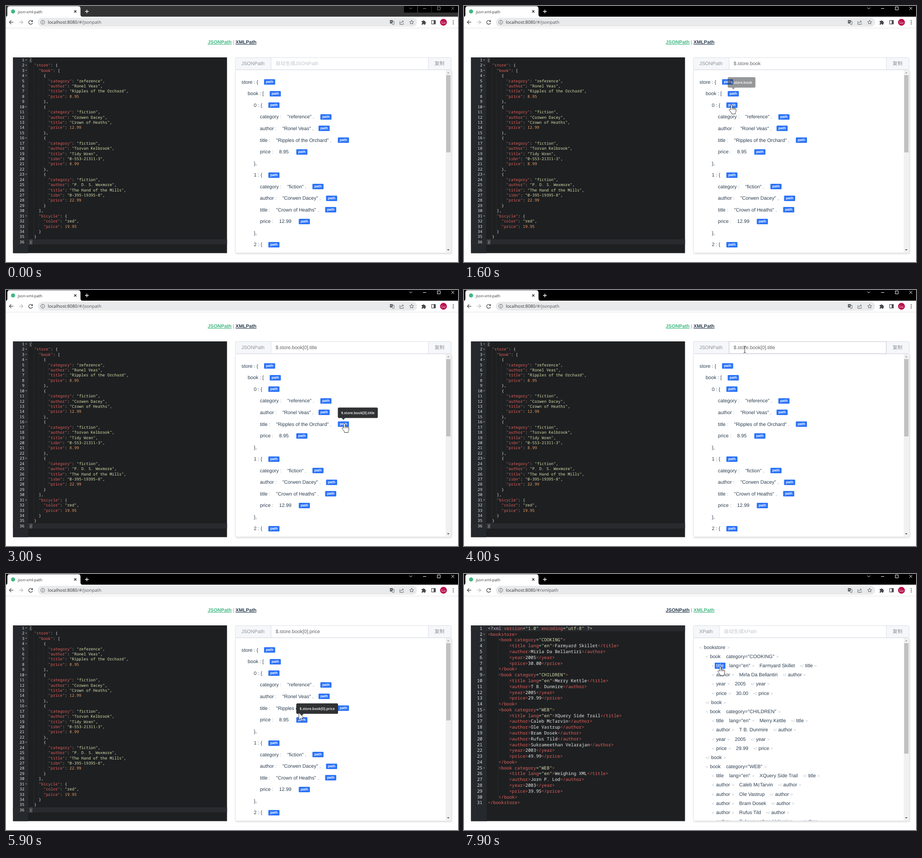
Animation of 995 by 563 pixels, one loop 8 s. Source, as an HTML page:

```html
<!DOCTYPE html>
<html lang="en">
<head>
<meta charset="utf-8">
<title>json-xml-path</title>
<style>
html, body { margin: 0; width: 100%; height: 100%; overflow: hidden; background: #fff; }
svg { display: block; width: 995px; height: 563px; }
text { font: 10.8px "Liberation Sans", Arial, "Noto Sans CJK SC", "Noto Sans CJK", sans-serif; fill: #2c3e50; white-space: pre; text-rendering: geometricPrecision; }
.ui { font-family: "Open Sans", "Noto Sans", sans-serif; fill: #333; }
.code { font-family: "Noto Sans Mono", "DejaVu Sans Mono", monospace; font-weight: 500; fill: #e6e8e4; }
.nav { font-weight: bold; font-size: 10.75px; }
.nav .u { text-decoration: underline; }
.mute { fill: #909399; }
.pale { fill: #b4bac6; font-size: 9px; }
.chip { font-weight: bold; font-size: 7.7px; fill: #fff; }
.tip { font: 600 7.8px "Open Sans", "Noto Sans", sans-serif; fill: #fff; }
.red { fill: #e2605c; } .str { fill: #d9deab; } .num { fill: #f0a064; }
.op { fill: #a5d0c9; } .kw { fill: #c9a8d0; }
</style>
</head>
<body>
<svg id="stage" viewBox="0 0 995 563"></svg>
<script>
const BLUE = '#2d74f7', GREEN = '#42b983', NAVY = '#2c3e50';
const LOOP = 8000, STEP = 100;

const esc = s => String(s).replace(/&/g, '&amp;').replace(/</g, '&lt;').replace(/>/g, '&gt;');
const text = (x, y, s, attr = '') => `<text x="${x}" y="${y}" ${attr}>${s}</text>`;
const span = (s, cls = '', dx = 0) => `<tspan class="${cls}" dx="${dx}">${esc(s)}</tspan>`;
const rect = (x, y, w, h, fill, attr = '') =>
  `<rect x="${x}" y="${y}" width="${w}" height="${h}" fill="${fill}" ${attr}/>`;
const line = (d, stroke, w = 1.2, attr = '') =>
  `<path d="${d}" fill="none" stroke="${stroke}" stroke-width="${w}" ${attr}/>`;
const shape = (d, fill, attr = '') => `<path d="${d}" fill="${fill}" ${attr}/>`;

// ---- content
const store = {
  store: {
    book: [
      { category: 'reference', author: 'Ronel Veas', title: 'Ripples of the Orchard', price: 8.95 },
      { category: 'fiction', author: 'Corwen Dacey', title: 'Crown of Heaths', price: 12.99 },
      { category: 'fiction', author: 'Torvan Kelbrook', title: 'Tidy Wren', isbn: '0-553-21311-3', price: 8.99 },
      { category: 'fiction', author: 'P. D. S. Wexmore', title: 'The Hand of the Mills', isbn: '0-395-19395-8', price: 22.99 }
    ],
    bicycle: { color: 'red', price: 19.95 }
  }
};
const shelf = [
  ['COOKING', 'Farmyard Skillet', ['Mirla Da Bellantiri'], 2005, '30.00'],
  ['CHILDREN', 'Merry Kettle', ['T B. Dunmire'], 2005, '29.99'],
  ['WEB', 'XQuery Side Trail', ['Caleb McTarvin', 'Ole Vastrup', 'Bram Dosek', 'Rufus Tild', 'Sukrameethan Velarajan'], 2003, '49.99'],
  ['WEB', 'Weighing XML', ['Jorn P. Lod'], 2003, '39.95']
];

// Each node: [level, tag, attribute, value]; tags starting with "/" close.
const nodes = [[0, 'bookstore']];
for (const [cat, title, authors, year, price] of shelf) {
  nodes.push([1, 'book', `category="${cat}"`], [2, 'title', 'lang="en"', title]);
  authors.forEach(a => nodes.push([2, 'author', '', a]));
  nodes.push([2, 'year', '', year], [2, 'price', '', price], [1, '/book']);
}
nodes.push([0, '/bookstore']);

// ---- editor
const jsonRules = [[/^"[^"]*"(?=:)/, 'red'], [/^"[^"]*"/, 'str'], [/^[\d.]+/, 'num'], [/^[^"\d]+/, '']];
const xmlRules = [[/^<\?/, ''], [/^xml(?= v)/, 'kw'], [/^\?>/, ''], [/^"[^"]*"/, 'str'], [/^=/, 'op'],
  [/^<\/?\w+/, 'red'], [/^ ?(lang|category|version|encoding)(?==)/, 'red'], [/^>/, 'red'], [/^[^<>="?]+/, ''], [/^./, '']];

function paint(src, rules) {
  let out = '';
  while (src) {
    const [re, cls] = rules.find(r => r[0].test(src));
    const part = src.match(re)[0];
    out += span(part, cls);
    src = src.slice(part.length);
  }
  return out;
}

function editor(lines, o) {
  const size = o.cw / 0.6, attr = `class="code" style="font-size:${size}px"`;
  let out = rect(15.5, 113, 471, 430.5, '#1d1f21') + rect(15.5, 113, o.x - 18, 430.5, '#25282c') +
    rect(15.5, 113 + o.active * o.pitch, 471, o.pitch, '#282a2e');
  lines.forEach((src, i) => {
    const indent = src.search(/\S/), top = 113 + i * o.pitch, base = top + o.pitch / 2 + size * 0.36;
    for (let c = o.tab; c <= indent; c += o.tab)
      out += line(`M${o.x + c * o.cw - 0.5} ${top}v${o.pitch}`, '#fff', 0.7, 'stroke-dasharray="1 1" opacity=".14"');
    out += text(40.5, base, i + 1, attr + ' text-anchor="end"');
    if (o.fold(src)) out += shape(`M42.3 ${base - 4}h4l-2 2.4z`, '#8a8d90');
    out += text(o.x + indent * o.cw, base, paint(src.trim(), o.rules), attr);
  });
  return out;
}

const jsonLines = JSON.stringify(store, null, 2).split('\n');
const xmlLines = ['<?xml version="1.0" encoding="utf-8" ?>'].concat(nodes.map(([lv, tag, at, val]) =>
  ' '.repeat(lv * 4) + `<${tag}${at ? ' ' + at : ''}>` + (val ? `${val}</${tag}>` : '')));

// ---- right panel
const ROW = 25.54, chipTop = i => Math.round(161.3 + ROW * i);
const chipX = [568, 580.5, 577.5, 692, 688, 730.5, 639, 0, 577.5, 674.5, 704.5, 702.5, 644.5, 0, 577.5];

function jsonTree() {
  const rows = [[0, 'store : {'], [1, 'book : [']];
  store.store.book.forEach((book, i) => {
    rows.push([2, i + ' : {']);
    for (const k in book) {
      const v = book[k], isText = typeof v === 'string';
      rows.push([3, span(k) + span(' :', 'mute') + span(isText ? `"${v}"` : v, '', 12.8) + (isText ? span(',', 'mute', 3) : '')]);
    }
    rows.push([2, '},']);
  });
  return rows.slice(0, chipX.length).map(([lv, s], i) => {
    const x = chipX[i], y = chipTop(i);
    return text(518.5 + lv * 13.5, 170.8 + ROW * i, s) +
      (x ? rect(x, y, 24.5, 12, BLUE, 'rx="1.5"') + text(x + 12.25, y + 8.4, 'path', 'class="chip" text-anchor="middle"') : '');
  }).join('');
}

function xmlTree() {
  return nodes.slice(0, 20).map(([lv, tag, at, val], i) => {
    const shut = tag[0] === '/', name = tag.replace('/', '');
    let s = span(shut ? '</' : '<', 'pale') + `<tspan dx="4.2"${i === 2 ? ' id="hot"' : ''}>${name}</tspan>`;
    if (at) s += span(at, '', 12);
    s += span('>', 'pale', 4);
    if (val) s += span(val, '', 11) + span('</', 'pale', 11) + span(name, '', 3.8) + span('>', 'pale', 3.4);
    return text(518.5 + lv * 13.5, 164.8 + 20.17 * i, s);
  }).join('');
}

function panel(label, split, thumb, tree) {
  return rect(505, 140.5, 475, 402.5, '#fff', 'rx="2" stroke="#dcdfe6" filter="url(#soft)"') +
    rect(505, 113.5, 475, 26.5, '#f5f7fa', 'rx="2" stroke="#dcdfe6"') +
    rect(split, 113.5, 929.5 - split, 26.5, '#fff', 'stroke="#dcdfe6" class="field"') +
    text(518, 129.8, label, 'class="mute"') + text(943.5, 129.8, '复制', 'class="mute"') +
    rect(968, 141, 11.5, 401.5, '#f1f1f1') + rect(969, 152, 9.5, thumb, '#c1c1c1') +
    shape('M971 148h5l-2.5-3z', '#a3a3a3') + shape('M971 535h5l-2.5 3z', '#505050') +
    `<g clip-path="url(#inner)">${tree}</g>`;
}

const link = (s, color) => `<tspan class="u" style="fill:${color}">${s}</tspan>`;
const nav = (a, b) => text(444, 83, link('JSONPath', a) +
  '<tspan style="fill:#b87868" font-weight="normal"> | </tspan>' + link('XMLPath', b), 'class="nav"');
const url = path => text(92, 39.2, `localhost:8080<tspan style="fill:#55585c">/#/${path}</tspan>`, 'class="ui" style="font-size:9.67px"');

// ---- browser frame
function chrome() {
  const ink = '#45484c', dark = '#5f6368';
  let s = rect(0, 0, 995, 24, '#333', 'id="bar"') + '<g id="blocks">';
  [876, 907, 937, 966].forEach(x => s += rect(x, 0, 29, 14.5, '#000'));
  s += '</g><g id="buttons" fill="none" stroke="#fff">' +
    '<path d="M888 3.5l3 3 3-3M918 5.5h7M949.5 2h6.5v6.5h-6.5zM980.5 2l6 6.5M986.5 2l-6 6.5"/></g>';
  s += shape('M0 24Q3 23 3 19V6Q3 .5 8 .5H159Q164 .5 164 6V19Q164 23 168 24Z', '#fff') +
    '<circle cx="15.5" cy="12" r="4.5" fill="#41b883"/>' +
    text(26, 15.6, 'json-xml-path', 'class="ui" style="font-size:8.4px"') +
    line('M150 9.5l5 5M155 9.5l-5 5', '#222', 1.2) + line('M174 12h8M178 8v8', '#fff', 1.3) +
    rect(0, 23.5, 995, 24.5, '#fff') + rect(0, 48, 995, 0.8, '#dcdcdc') +
    rect(70, 26, 835, 19.5, '#e9eaeb', 'rx="9.75"') +
    line('M16 35.7H7.5M11.5 31.5l-4.2 4.2 4.2 4.2', ink, 1.3) +
    line('M28.5 35.7H37M33 31.5l4.2 4.2-4.2 4.2', '#b5b7ba', 1.2) +
    line('M57.7 33.2A4.3 4.3 0 1 0 58.4 37.2', ink, 1.3) + shape('M59 30.8v4.2h-4.2z', ink) +
    `<circle cx="81" cy="35.7" r="4.3" fill="none" stroke="${dark}"/>` + line('M81 35v3M81 32.8v1.2', dark, 1.1);
  // page actions
  s += rect(845, 31, 6.5, 7.5, dark, 'rx="1"') + line('M849 33.5h5.3v7h-4.5', dark, 0.9) +
    line('M846.5 34.5h3.5M848.2 33v1.5M850.5 36.5h3M852 36l-1.2 3', '#e9eaeb', 0.7) +
    line('M868 34h-1v6.5h7.5v-3M869.5 38c0-3 2-4 5-4M872.5 31.6l2.6 2.4-2.6 2.4', dark, 1) +
    line('M893 31.2l1.3 3 3.2.3-2.4 2.1.7 3.2-2.8-1.7-2.8 1.7.7-3.2-2.4-2.1 3.2-.3z', dark, 1) +
    shape('M915 33h2.5a1.6 1.6 0 0 1 3.2 0h2.3v2.5a1.6 1.6 0 0 1 0 3.2v2.3h-2.6a1.5 1.5 0 0 0-3 0H915v-2.6a1.5 1.5 0 0 0 0-3z', ink) +
    rect(937, 31.8, 8.2, 7.8, 'none', `stroke="${ink}" stroke-width="1.2"`) + rect(941.5, 31.8, 3.7, 7.8, ink) +
    '<circle cx="963" cy="35.7" r="7.5" fill="#b8124c"/>' +
    text(963, 38.7, 'Lu', 'class="ui" text-anchor="middle" style="font-size:8px;fill:#fff"');
  [32, 35.7, 39.4].forEach(y => s += `<circle cx="984.5" cy="${y}" r="1.1" fill="${ink}"/>`);
  return s;
}

// ---- pointer
const pointers = {
  arrow: shape('M0 0V16L3.7 12.6 6.3 18.5 8.8 17.4 6.2 11.7 11.3 11.3Z', '#fff', 'stroke="#222" stroke-width=".9"'),
  beam: line('M-2.5 -7.5Q0 -7.5 0 -6Q0 -7.5 2.5 -7.5M0 -6.5V6.5M-2.5 7.5Q0 7.5 0 6Q0 7.5 2.5 7.5', '#333', 1),
  hand: '<g transform="translate(-5.7 0)">' +
    shape('M4 1.9a1.7 1.7 0 0 1 3.4 0V7.3c.6-1 2.5-.8 2.8.4 .8-.8 2.4-.4 2.7.7 1-.6 2.6 0 2.6 1.6V14c0 2-1.2 3-1.6 4.2V20.5H5.8V18.6L1 12.6C.2 11.4.6 10 1.8 9.8 2.8 9.6 3.5 10.4 4 11Z',
      '#fff', 'stroke="#222" stroke-width=".9"') + line('M7.4 7.2V11M10.2 7.8V11M12.9 8.5V11', '#222', 0.9) + '</g>'
};

const track = [
  [300, 866, 134], [400, 840, 143], [500, 770, 163], [700, 667, 184], [800, 612, 195], [1000, 591.5, 192],
  [1400, 591.5, 192], [1600, 589, 217], [2000, 589, 217], [2200, 734, 270], [2400, 767, 286], [2600, 747, 297],
  [3000, 745, 293], [3200, 765, 250], [3350, 768, 182], [3600, 700, 132], [3800, 700, 132], [4100, 577, 130],
  [4200, 577, 130], [4500, 650, 163], [4700, 748, 218], [4900, 690, 318], [5000, 667, 360], [5100, 651, 320],
  [5800, 651, 320], [6100, 632, 275], [6400, 585, 165], [6700, 541, 82], [6800, 539.5, 82],
  [7300, 539.5, 82], [7500, 557, 119], [7700, 572, 198], [7800, 572, 210], [7900, 564, 203]
];
const values = [[0, ''], [1400, '$.store.book'], [1900, '$.store.book[0]'], [2800, '$.store.book[0].title'],
  [5700, '$.store.book[0].price'], [7000, '']];
// row, width, label, fade-in start, fade-out end
const tips = [
  [1, 61, '$.store.book', 800, 1700], [2, 71, '$.store.book[0]', 1600, 2400],
  [5, 88, '$.store.book[0].title', 2600, 3300], [6, 92, '$.store.book[0].price', 5100, 6100]
];

function place(t) {
  const i = track.findIndex(k => k[0] > t);
  if (i < 0) return track[track.length - 1].slice(1);
  const [t0, x0, y0] = track[i - 1], [t1, x1, y1] = track[i], k = (t - t0) / (t1 - t0);
  return [x0 + (x1 - x0) * k, y0 + (y1 - y0) * k];
}

// ---- scene
const bracket = y => rect(51.5, y, 5, 10, 'none', 'stroke="#55585b" stroke-width=".7"');

document.getElementById('stage').innerHTML =
  '<defs><clipPath id="inner"><rect x="505" y="141" width="463" height="401.5"/></clipPath>' +
  '<filter id="soft" x="-5%" y="-5%" width="110%" height="110%"><feDropShadow dx="1" dy="1.5" stdDeviation="1.8" flood-opacity=".16"/></filter></defs>' +
  rect(0, 0, 995, 563, '#fff') + chrome() +
  '<g id="json">' + url('jsonpath') + nav(GREEN, NAVY) +
  editor(jsonLines, { x: 51.5, cw: 5.2, pitch: 11.43, tab: 2, active: 35, rules: jsonRules, fold: s => /[{[]$/.test(s) }) +
  bracket(114) + bracket(514) + line('M57 513.5v11', '#8f9091', 0.8) +
  panel('JSONPath', 583.5, 170, jsonTree()) + '</g>' +
  '<g id="xml">' + url('xmlpath') + nav(NAVY, GREEN) +
  editor(xmlLines, { x: 52.5, cw: 5.9, pitch: 12.78, tab: 4, active: 0, rules: xmlRules, fold: s => /^ *<book/.test(s) }) +
  panel('XPath', 562, 243, rect(552, 195, 23.5, 13.5, BLUE, 'id="mark"') + xmlTree()) + '</g>' +
  text(593, 129.8, '', 'id="value"') +
  tips.map(([row, w, label], i) => {
    const x = chipX[row], y = chipTop(row) - 30.5;
    return `<g id="tip${i}">` + rect(x, y, w, 23, '#303133', 'rx="2.8"') +
      shape(`M${x + 8.2} ${y + 22.8}h8l-4 4.2z`, '#303133') +
      text(x + w / 2, y + 14.4, label, 'class="tip" text-anchor="middle"') + '</g>';
  }).join('') + '<g id="pointer"></g>';

const $ = id => document.getElementById(id);
const set = (id, name, v) => $(id).setAttribute(name, v);
const show = (id, on) => set(id, 'visibility', on ? 'visible' : 'hidden');
const inside = (x, y, l, t, w, h) => x >= l && x <= l + w && y >= t && y <= t + h;
const unit = v => Math.max(0, Math.min(1, v));

function draw(t) {
  const xml = t >= 7000, active = t >= 1300, on = t >= 300;
  $('json').style.display = xml ? 'none' : '';
  $('xml').style.display = xml ? '' : 'none';
  set('bar', 'fill', active ? '#000' : '#333');
  show('blocks', !active);
  set('buttons', 'stroke', active ? '#fff' : '#8c8c8c');

  const value = values.filter(v => v[0] <= t).pop()[1];
  $('value').textContent = value || '自动生成' + (xml ? 'XPath' : 'JSONPath');
  set('value', 'x', xml ? 572 : 593.5);
  $('value').style.fill = value ? '#606266' : '#c0c4cc';

  tips.forEach(([, , , from, to], i) => set('tip' + i, 'opacity', Math.min(unit((t - from) / 300), unit((to - t) / 200))));

  const [x, y] = on ? place(t) : [0, 0];
  const field = inside(x, y, 584, 114, 345, 26);
  const hot = xml && inside(x, y, 552, 195, 23.5, 13.5);
  const overNav = inside(x, y, 505, 73, 47, 13);
  const chip = !xml && chipX.some((cx, i) => cx && inside(x, y, cx, chipTop(i), 24.5, 12));
  show('mark', hot);
  $('hot').style.fill = hot ? '#fff' : NAVY;
  document.querySelectorAll('.field').forEach(f => f.setAttribute('stroke', field ? '#c0c4cc' : '#dcdfe6'));
  $('pointer').innerHTML = on ? pointers[field ? 'beam' : hot || overNav || chip ? 'hand' : 'arrow'] : '';
  set('pointer', 'transform', `translate(${x} ${y})`);
}

function tick() {
  draw(Math.floor(performance.now() % LOOP / STEP) * STEP);
  requestAnimationFrame(tick);
}
tick();
</script>
</body>
</html>
```
